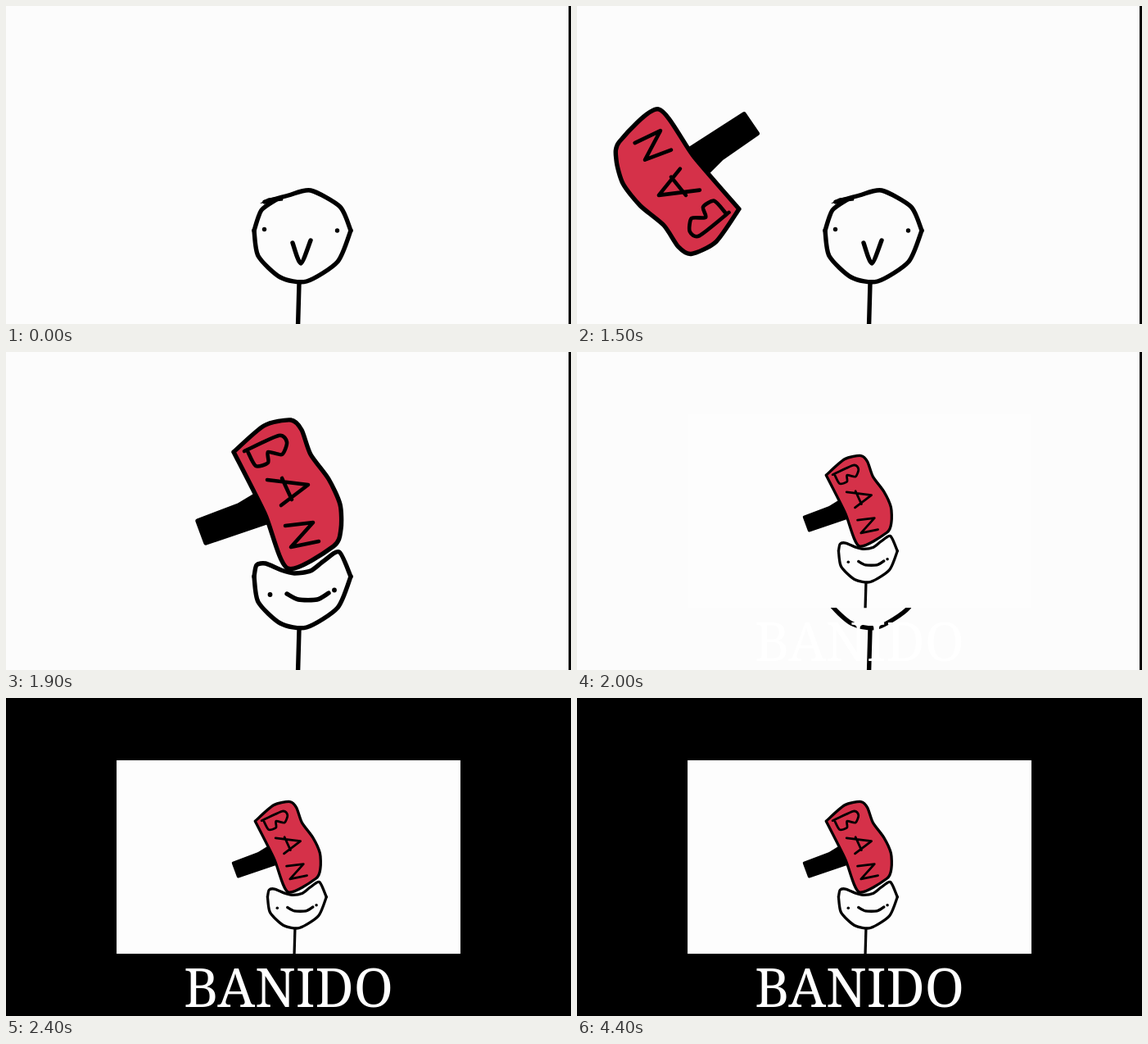
Animation of 690 by 388 pixels, one loop 7700 ms. Source, as an HTML page:

```html
<!DOCTYPE html>
<html lang="pt">
<head>
<meta charset="utf-8">
<title>Banido</title>
<style>
  html, body { margin: 0; width: 100%; height: 100%; overflow: hidden; background: #fcfcfc; }
  svg { display: block; width: 100vw; height: 100vh; }
  .line { fill: none; stroke: #000; stroke-width: 5.4; stroke-linecap: round; stroke-linejoin: round; }
  .thin { stroke-width: 4.6; }
  .title { font: 65px "Noto Serif", serif; fill: #fff; text-anchor: middle; }
</style>
</head>
<body>
<svg viewBox="0 0 690 388">
  <defs>
    <clipPath id="frame"><rect width="690" height="388"/></clipPath>

    <g id="body" class="line">
      <path d="M358 338L356.500 392"/>
      <path data-curve="421 274 405 312 367 336 335 331 308 305 303 274"/>
    </g>

    <g id="calm">
      <use href="#body"/>
      <path class="line" data-curve="303 274 312 249 332 235"/>
      <path class="line" data-curve="316 239 345 231 372 225 408 245 421 274"/>
      <path d="M310 241L320 234.500L339 232L338 237.500Z"/>
      <circle cx="315.500" cy="272.500" r="2.700"/>
      <circle cx="404.500" cy="274" r="2.700"/>
      <path class="line" data-curve="350 289 360 314 372 286"/>
    </g>

    <g id="hammer" class="line">
      <path fill="#000" d="M234 206L284 187L304 175L318 208L244 233Z"/>
      <path fill="#d53149" data-curve="278 122 315 90 348 83 361 95 372 125 394 155 408 186 409 216 400 237 344 264 316 197 278 122"/>
      <g class="thin">
        <path data-curve="291 121 333 102 343 110 337 125 320 122 320 135 305 139 295 121"/>
        <path d="M319 156L369 162L336 187M337 154L349 180"/>
        <path d="M341 212L375 208L348 238L382 231"/>
      </g>
    </g>

    <g id="hit">
      <use href="#body"/>
      <path class="line" data-curve="303 274 306 260 317 258 336 266 352 270 372 267 388 255 407 244 421 274"/>
      <circle cx="322.500" cy="296" r="2.900"/>
      <circle cx="401" cy="290.500" r="2.900"/>
      <path class="line" data-curve="343 295 357 302 380 302 394 294"/>
      <use href="#hammer"/>
    </g>
  </defs>

  <rect width="690" height="388" fill="#fcfcfc"/>
  <use href="#calm" data-on="0 1600"/>
  <use href="#hammer" data-on="1400 1500" transform="translate(30 55) rotate(87) translate(-343 -175)"/>
  <use href="#hammer" data-on="1500 1600" transform="translate(122 212) rotate(166) translate(-343 -175)"/>
  <use href="#hit" data-on="1600 2100"/>
  <rect x="687" width="3" height="388"/>

  <rect width="690" height="388" data-on="2100 7700"/>
  <g data-on="2000 7700">
    <g transform="translate(135 76) scale(.6087)" clip-path="url(#frame)">
      <rect width="690" height="388" fill="#fdfdfd"/>
      <use href="#hit"/>
    </g>
    <text class="title" x="345" y="377">BANIDO</text>
  </g>
</svg>
<script>
  const LOOP = 7700;
  const TENSION = 1 / 8;

  // Cardinal spline through a few key points
  function curve(text) {
    const n = text.split(" ").map(Number);
    const p = [];
    for (let i = 0; i < n.length; i += 2) p.push([n[i], n[i + 1]]);
    let d = `M${p[0]}`;
    for (let i = 0; i < p.length - 1; i++) {
      const a = p[i - 1] || p[i], b = p[i], c = p[i + 1], e = p[i + 2] || c;
      const c1 = b.map((v, k) => v + (c[k] - a[k]) * TENSION);
      const c2 = c.map((v, k) => v - (e[k] - b[k]) * TENSION);
      d += `C${c1} ${c2} ${c}`;
    }
    return d;
  }

  for (const el of document.querySelectorAll("[data-curve]"))
    el.setAttribute("d", curve(el.dataset.curve));

  const parts = [...document.querySelectorAll("[data-on]")].map(el => {
    const [from, to] = el.dataset.on.split(" ").map(Number);
    return { el, from, to };
  });

  const start = performance.now();

  function draw(now) {
    const t = Math.max(0, now - start) % LOOP;
    for (const { el, from, to } of parts)
      el.style.display = t >= from && t < to ? "" : "none";
    requestAnimationFrame(draw);
  }
  draw(start);
</script>
</body>
</html>
```
